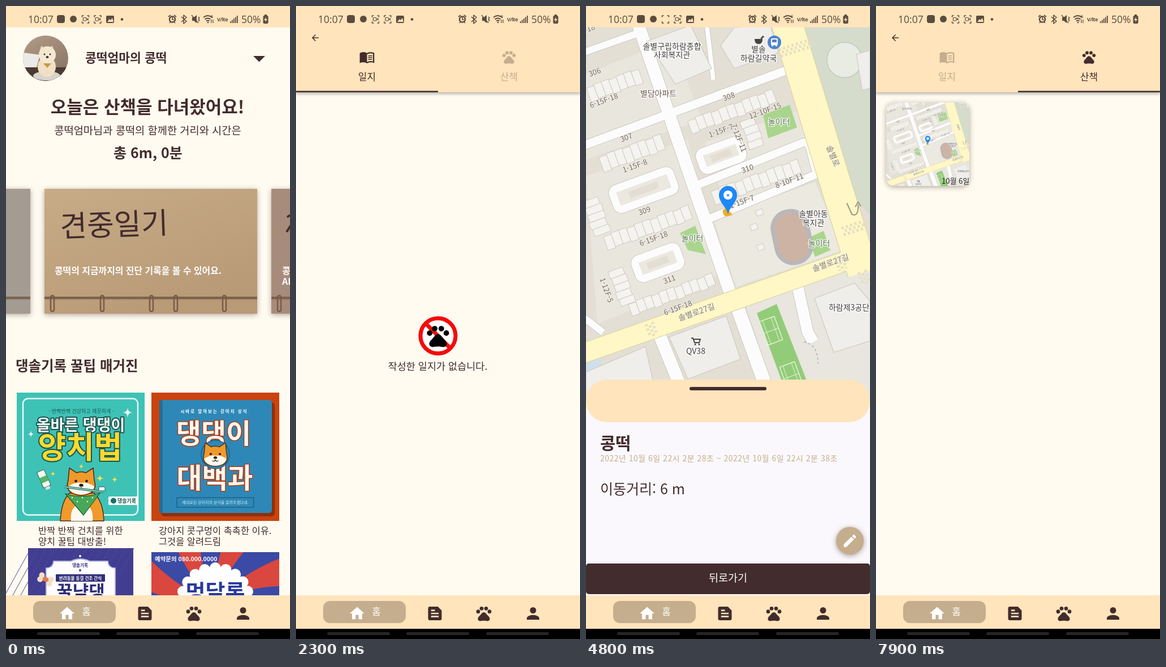
Animation, 502 px wide and 1115 px high, one loop 8000 ms. Source, as an HTML page:

```html
<!DOCTYPE html>
<html lang="ko">
<head>
<meta charset="utf-8">
<style>
html, body { margin: 0; width: 100%; height: 100%; overflow: hidden; background: #fffbf0; }
svg { display: block; width: 502px; height: 1115px; }
text { font-family: "Noto Sans CJK KR", "Noto Sans CJK", "Noto Sans", sans-serif; white-space: pre; }
.num { font-family: "Open Sans", sans-serif; }
.soft { filter: drop-shadow(0 2px 5px rgba(60, 40, 30, .4)); }
.bar { filter: drop-shadow(0 2px 3px rgba(0, 0, 0, .35)); }
</style>
</head>
<body>
<svg id="stage" viewBox="0 0 502 1115"></svg>
<script>
const DARK = '#432c2d', TAN = '#c5ae8d', CREAM = '#ffe4bc', PAPER = '#fffbf0';
const times = (n, fn) => Array.from({ length: n }, (_, i) => fn(i)).join('');
const rect = (x, y, w, h, fill, r = 0, more = '') =>
  `<rect x="${x}" y="${y}" width="${w}" height="${h}" rx="${r}" fill="${fill}" ${more}/>`;
const dot = (x, y, r, fill, more = '') => `<circle cx="${x}" cy="${y}" r="${r}" fill="${fill}" ${more}/>`;
const oval = (x, y, rx, ry, fill, more = '') =>
  `<ellipse cx="${x}" cy="${y}" rx="${rx}" ry="${ry}" fill="${fill}" ${more}/>`;
const path = (d, fill, more = '') => `<path d="${d}" fill="${fill}" ${more}/>`;
const line = (d, color, w, more = '') =>
  `<path d="${d}" fill="none" stroke="${color}" stroke-width="${w}" stroke-linejoin="round" ${more}/>`;
const ink = (color, w) => `stroke="${color}" stroke-width="${w}" stroke-linejoin="round"`;
const halo = (color, w) => ink(color, w) + ' paint-order="stroke"';
const text = (x, y, size, str, fill = DARK, weight = 400, more = '') =>
  `<text x="${x}" y="${y}" font-size="${size}" font-weight="${weight}" fill="${fill}" ${more}>${str}</text>`;
const mid = (x, y, size, str, fill, weight, more = '') =>
  text(x, y, size, str, fill, weight, 'text-anchor="middle" ' + more);
const at = (x, y, body, more = '') => `<g transform="translate(${x} ${y}) ${more}">${body}</g>`;

const ICONS = {
  home: path('M10 20v-6h4v6h5v-8h3L12 3 2 12h3v8z'),
  feed: path('M16 3H5c-1.1 0-2 .9-2 2v14c0 1.1.9 2 2 2h14c1.1 0 2-.9 2-2V8l-5-5zM7 7h5v2H7V7zm10 10H7v-2h10v2zm0-4H7v-2h10v2z'),
  paw: path('M17.3 14.9c-.9-1-1.6-1.9-2.4-2.9-.8-.9-1.6-1.5-2.9-1.5s-2.1.6-2.9 1.5c-.8 1-1.6 1.9-2.4 2.9-1.3 1.3-2.9 2.8-2.6 4.8.3 1 1 2 2.3 2.3.7.2 3.1-.4 5.6-.4s4.9.6 5.6.4c1.3-.3 2-1.3 2.3-2.3.3-2-1.3-3.5-2.6-4.8z') +
    times(4, i => dot([4.5, 9, 15, 19.5][i], i % 3 ? 5.5 : 9.5, 2.5)),
  person: path('M12 12a4 4 0 1 0 0-8 4 4 0 0 0 0 8zm0 2c-2.7 0-8 1.3-8 4v2h16v-2c0-2.7-5.3-4-8-4z'),
  back: path('M20 11H7.8l5.6-5.6L12 4l-8 8 8 8 1.4-1.4L7.8 13H20z'),
  book: path('M21 5c-3-.9-6.800-.7-9 1-2.600-1.900-7.900-2-11 0v15c3-1.500 8.200-1.600 11 .5 2.800-1.700 7.500-2.200 11-.5V6c-.6-.5-1.300-.8-2-1zm0 13.500c-3-.9-6.500-.5-9 1V8c2.600-1.600 6-1.900 9-1z') +
    times(3, i => line(`M13.800 ${10.600 + i * 2.700}q3-1.200 6-.6`, 'currentColor', 1.300)),
  edit: path('M3 17.250V21h3.750L17.810 9.940l-3.750-3.750zM20.700 7a1 1 0 0 0 0-1.400l-2.300-2.300a1 1 0 0 0-1.400 0l-1.900 1.800 3.800 3.800z')
};
for (const k in ICONS) ICONS[k] = ICONS[k].replaceAll('"undefined"', '"currentColor"');
const icon = (name, x, y, size, color) =>
  `<g style="color:${color}">${at(x - size / 2, y - size / 2, ICONS[name], `scale(${size / 24})`)}</g>`;

function mapArt() {
  const EDGE = '#cdc9be', LABEL = '#6e645a';
  const row = (x, y, n, w, h, turn = -20) => at(x, y,
    times(n, i => rect(i * w, i % 3 ? 0 : 2, w, h, '#f5f3ef', 0, ink('#cfcac2', 1))), `rotate(${turn})`);
  const ring = (x, y, w, h) => at(x, y,
    rect(-w / 2, -h / 2, w, h, '#ebe8df', 8, ink(EDGE, 15)) +
    rect(-w / 2, -h / 2, w, h, '#ebe8df', 8, ink('#fdfcfd', 13)) +
    rect(-w / 4, -6, w / 2, 12, '#e2ded3'), 'rotate(-20)');
  const tag = (x, y, s, turn = -20, size = 13, color = LABEL) =>
    at(x, y + 4, mid(0, 0, size, s, color, 500, halo('#f4f2ec', 2)), `rotate(${turn})`);
  const place = (x, y, s, color = '#3d3a38') => mid(x, y + 5, 14, s, color, 500, halo('#fff', 2.500));
  const stripes = (x, y, w, turn) => at(x, y,
    times(3, i => line(`M${-w / 2 + i % 2 * 4} ${i * 6 - 6}h${w}`, '#e6dfc2', 5, 'stroke-dasharray="4 4"')), `rotate(${turn})`);
  const block = d => path(d, '#f0eeea', ink('#cfcac2', 1.200));
  const lanes = [
    ['M88 20L258 515', 22], ['M-5 246L355 113', 15], ['M190 318L385 240Q392 240 395 247L408 296L215 376', 14],
    ['M-5 82L100 45', 12], ['M225 130L212 20', 8], ['M122 560L175 690', 22], ['M262 515L325 690', 24],
    ['M372 485L392 575L402 592', 20], ['M-5 548L30 575', 12]
  ];
  const yellow = [['M-20 617L460 449L520 432', 34], ['M352 20L436 296L490 470', 54]];
  const paint = (list, color, extra) => list.map(([d, w]) => line(d, color, w + extra)).join('');
  const court = y => at(327, y, rect(-14, -22, 28, 44, 'none', 0, ink('#e4f3dc', 1.500)) +
    line('M-14 0H14M-8 -22V22M8 -22V22', '#e4f3dc', 1), 'rotate(-20)');
  return rect(0, 30, 502, 670, '#e3dfd5') +
    path('M0 120L150 60 205 200 0 270zM210 240L390 180 410 300 250 360zM0 300L180 235 240 470 20 560z', '#e9e6dd') +
    path('M225 375L405 310 455 430 265 495z', '#ece9e1') +
    path('M370 20H502V370L470 330z', '#d5dccb') +
    path('M280 520L502 440V700H340z', '#e8e6df') +
    path('M0 628L25 620 40 690H0z', '#cfe0ea') +
    paint(lanes, EDGE, 2) + paint(lanes, '#fdfcfd', 0) +
    ring(102, 324, 108, 38) + ring(239, 263, 74, 34) + ring(127, 452, 78, 36) +
    paint(yellow, '#d8cf9f', 2) + paint(yellow, '#fff7c5', 0) +
    row(0, 143, 7, 14, 26) + row(22, 265, 8, 14.500, 28) + row(179, 201, 11, 14.500, 24) +
    row(220, 325, 11, 14.800, 25) + row(30, 405, 11, 14.500, 25) + row(74, 524, 11, 14.300, 22) +
    row(298, 195, 4, 13, 26, 70) + row(22, 335, 5, 13, 30, 70) + row(66, 459, 5, 13, 27, 70) +
    block('M108 62L185 34 222 110 158 138z') + block('M238 70L262 38 325 30 340 82 262 110z') +
    block('M147 583L248 546 273 622 180 657z') + block('M404 515L475 488 502 520V590L438 610z') +
    block('M0 645L105 600 125 690H0z') +
    dot(457, 95, 31, '#e9ece3', ink('#c4cabb', 1.500)) + block('M478 85L502 78V145L488 148z') +
    times(8, i => rect([20, 50, 258, 277, 257, 296, 5, 340][i], [208, 195, 392, 365, 430, 528, 445, 500][i], 12, 10, '#f5f3ef', 0,
      ink('#cfcac2', 1) + ` transform="rotate(-20 ${[20, 50, 258, 277, 257, 296, 5, 340][i]} 300)" visibility="${i > 1 && i < 5 ? 'visible' : 'hidden'}"`)) +
    path('M313 192L360 174 373 214 322 233zM166 400L193 387 212 437 180 430zM392 409L420 396 432 430 405 442z', '#a9d58c') +
    path('M302 541L337 525 402 690H357z', '#93cc78') + court(572) + at(36, 0, court(652)) +
    rect(333, 361, 62, 92, '#cdb3a3', 30, ink('#b9b7bb', 7) + ' transform="rotate(-12 364 407)"') +
    line('M385 592Q410 595 410 630', '#bbb', 2, 'stroke-dasharray="4 4"') +
    stripes(370, 74, 58, -18) + stripes(482, 388, 60, -18) + stripes(115, 568, 20, 70) + stripes(450, 452, 26, 70) + stripes(492, 478, 24, 70) +
    line('M461 347L470 367Q482 372 481 350M476 354l5 -9 5 8', '#9c9682', 2) +
    tag(17, 117, '306') + tag(33, 167, '6-15F-18') + tag(73, 232, '307') + tag(88, 282, '1-15F-8') +
    tag(254, 160, '308') + tag(318, 185, '12-10F-15') + tag(240, 220, '1-15F-7') + tag(266, 230, '7-12F-11', 68) +
    tag(287, 287, '310') + tag(361, 308, '8-10F-11') + tag(277, 345, '1-15F-7') + tag(105, 361, '309') +
    tag(121, 410, '6-15F-18') + tag(32, 498, '1-12F-5', 70) + tag(149, 482, '311') + tag(164, 532, '6-15F-18') + tag(8, 40, '-18') +
    tag(432, 262, '솔별로', 68, 14, '#8f8358') + tag(197, 540, '솔별로27길', -19, 14, '#8f8358') + tag(434, 453, '솔별로27길', -19, 14, '#8f8358') +
    place(152, 71, '솔별구립하람종합') + place(152, 86, '사회복지관') + place(128, 154, '별담아파트', '#6a5548') +
    place(305, 76, '별솔') + place(305, 92, '하람길약국') + place(402, 366, '솔별아동') + place(402, 382, '복지관') +
    place(341, 204, '놀이터', '#4d6b3c') + place(188, 409, '놀이터', '#4d6b3c') + place(412, 418, '놀이터', '#4d6b3c') +
    place(465, 531, '하람제3공단') + place(194, 608, 'QV38') +
    path('M298 58h14q0 9-7 9t-7-9zM308 57l5-5 2 2-4 4z', '#444') +
    dot(333, 64, 12, '#4d84d2') + rect(327, 57, 12, 12, '#fff', 2) + rect(329, 59, 8, 5, '#4d84d2') + rect(328, 69, 3, 2, '#fff') + rect(335, 69, 3, 2, '#fff') +
    line('M186 585h3l3 8h8l2-6h-12', '#444', 2) + dot(193, 596, 1.500, '#444') + dot(200, 596, 1.500, '#444') +
    path('M242 360l6-6 11 14-11 3q-7-3-6-11z', '#f0ad25') +
    path('M251 367C248 353 235 346 235 333a16 16 0 0 1 32 0C267 346 254 353 251 367z', '#1e88f5') +
    dot(251, 333, 8, '#fff') + path('M248 332h6l-3 4z', '#1e88f5');
}

const star = (x, y, r, fill) => path(`M${x} ${y - r}Q${x} ${y} ${x + r} ${y}Q${x} ${y} ${x} ${y + r}Q${x} ${y} ${x - r} ${y}Q${x} ${y} ${x} ${y - r}z`, fill);

function shibaHead(x, y, k) {
  const o = ink('#4a2a17', 1.500);
  return at(x, y, path('M-22 -4L-20 -25 -8 -17Q0 -20 8 -17L20 -25 22 -4Q27 12 14 18Q0 24 -14 18Q-27 12 -22 -4z', '#f09a2c', o) +
    path('M0 0Q-10 -2 -22 6Q-20 18 0 20Q20 18 22 6Q10 -2 0 0z', '#fffaf0') +
    dot(-9, -3, 2.300, '#2c1a12') + dot(9, -3, 2.300, '#2c1a12') + oval(0, 4, 3.500, 2.500, '#2c1a12') +
    line('M-6 10Q-2 13 0 8Q2 13 6 10', '#2c1a12', 1.300), `scale(${k})`);
}

function toothCard() {
  const o = halo('#17574f', 4);
  return rect(19, 681, 226, 226, '#3fc2b6') + rect(30, 691.500, 203, 205, 'none', 9, ink('#e9fbf8', 2.500)) +
    mid(133, 717, 9, '- 반짝반짝 건강하고 깨끗하게 -', '#17574f', 500) +
    mid(132, 748, 27, '올바른 댕댕이', '#fff', 900, o) + mid(131, 797, 54, '양치법', '#ffd92e', 900, o) +
    star(215, 716, 9, '#fff') + star(44, 754, 6, '#fff') + star(166, 832, 7, '#ffe04a') + star(192, 834, 6, '#ffe04a') + star(83, 824, 5, '#ffe04a') + star(133, 811, 5, '#ffe04a') +
    at(66, 831, rect(-7, -13, 14, 30, '#f2f8ee', 2, ink('#17574f', 1)) + rect(-7, -2, 14, 10, '#58b36b') + rect(-4, 17, 8, 5, '#d9e3dd', 1), 'rotate(-24)') +
    path('M96 907Q98 872 112 858H156Q172 874 173 907z', '#f09a2c', ink('#4a2a17', 1.500)) + path('M115 907Q112 880 134 876Q156 880 153 907z', '#fffaf0') +
    shibaHead(133, 840, 1.050) + path('M105 859Q135 869 166 858L137 897z', '#47a85a', ink('#1d5a33', 1.200)) +
    times(5, i => dot(117 + i * 9, 866 + i % 2 * 7, 1.200, '#fff')) +
    line('M104 847L172 856', '#17574f', 4) + line('M104 847L172 856', '#8fd8c2', 2) + rect(164, 847, 11, 7, '#fff', 1, ink('#17574f', 1)) +
    rect(181, 864, 53, 15, '#fff', 2) + dot(190, 871.500, 5, '#17706a') + text(197, 875, 9, '댕솔기록', '#17574f', 700);
}

function bookCard() {
  const o = halo('#b23a12', 3);
  return rect(257, 681, 226, 226, '#c9430f') + rect(274, 698, 201, 201, '#8f300f', 6) + rect(271, 694, 199, 199, '#2e88b7', 5) +
    rect(271, 694, 6, 199, '#226f99', 3) +
    mid(368, 717, 7.500, '시바로 알아보는 강아지 상식', '#fff', 700, 'letter-spacing="2"') +
    mid(367, 770, 48, '댕댕이', '#fff8ee', 900, o) + mid(369, 849, 49, '대백과', '#fff8ee', 900, o) +
    dot(370, 790, 25, '#2e88b7', ink('#1d5f86', 1.500)) + shibaHead(370, 792, .9) +
    rect(302, 866, 136, 17, 'none', 0, ink('#174e70', 1)) + mid(370, 877, 7, '제대로된 강아지의 상식을 알려주겠다네.', '#d8edf7');
}

function snackCard() {
  return rect(39, 955, 186, 90, '#413e92') + times(14, i => line(`M${44 + i * 14} 955l-50 90`, '#4b489e', 1)) +
    path('M71 1045V990Q83 990 84 978H115Q131 970 148 978H180Q181 990 193 990V1045z', '#fdfdff', ink('#b9b7e2', 2)) +
    dot(131, 969, 2, '#fff') + mid(131, 988, 7.500, '댕솔기록', '#2f2d78', 700) + dot(131, 994, 2, '#413e92') +
    rect(88, 1001, 87, 13, '#2f2d78', 1) + mid(131.500, 1010.500, 7.500, '반려동물 동결 건조 간식', '#fff', 700) +
    mid(132, 1043, 31, '꿀냠댕', '#2f2d78', 900) +
    at(70, 1010, rect(-8, -4, 16, 8, '#dd7a4f') + times(4, i => dot(i % 2 ? 9 : -9, i < 2 ? -4 : 4, 5, '#f6dcc5')), 'rotate(25)');
}

function bathCard() {
  const ray = i => { const p = (a, r) => `${370 + r * Math.cos(a)} ${1050 + r * Math.sin(a)}`, a = i * .785 + .3;
    return path(`M370 1050Q${p(a, 80)} ${p(a + .35, 190)}L${p(a + .75, 190)}Q${p(a + .4, 80)} 370 1050z`, '#3b4aa5'); };
  return `<g clip-path="url(#bath)">${rect(257, 962, 226, 90, '#d9473f')}${times(8, ray)}` +
    times(20, i => dot(370 + 60 * Math.cos(i * .314), 1050 + 60 * Math.sin(i * .314), 10, '#fff')) + dot(370, 1050, 62, '#fff') +
    mid(370, 1046, 38, '멍달록', '#2a3b9c', 900) + '</g>' + text(263, 978, 10.500, '예약문의 080.000.0000', '#fff', 700);
}

function homeArt() {
  const binding = (x, w) => rect(x, 512, w, 4, '#7d614d') + rect(x, 516, w, 1.500, '#00000022');
  const loops = [82, 170, 257, 300, 386].map(x => rect(x - 3, 510, 6, 28, 'none', 3, ink('#7a5a45', 2.500))).join('');
  const slide = (x, w, fill) => rect(x, 322, w, 220, fill, 0, 'class="soft"') + binding(x, w);
  return rect(0, 0, 502, 1038, PAPER) +
    `<g clip-path="url(#face)">${rect(30, 52, 80, 80, 'url(#wall)')}${path('M30 82L60 86 54 108H30z', '#eceae6')}${rect(30, 108, 80, 30, '#4a3a33')}` +
    oval(72, 123, 24, 8, '#d8d4cd') + oval(72, 107, 16, 18, '#efe0c6') + path('M58 84L62 70 72 76 82 70 87 84z', '#e6d2b2') + dot(73, 86, 15, '#f4e8d2') +
    dot(68, 85, 1.500, '#332') + dot(78, 85, 1.500, '#332') + oval(73, 90, 2.500, 2, '#332') + path('M66 101h14l-7 8z', '#c99a3e') + '</g>' +
    text(140, 99, 21.500, '콩떡엄마의 콩떡', DARK, 700) + path('M437 88H458L447.500 98.500z', DARK) +
    mid(250, 189, 31, '오늘은 산책을 다녀왔어요!', DARK, 700) +
    mid(250.500, 226, 18.700, '콩떡엄마님과 콩떡의 함께한 거리와 시간은', DARK, 500) +
    mid(251, 268, 25, '총 6m, 0분', DARK, 700) +
    slide(-20, 63, '#a49b93') + slide(68, 376, 'url(#kraft)') + slide(469, 60, '#a88c7b') + loops +
    rect(480, 510, 6, 28, 'none', 3, ink('#7a5a45', 2.500)) +
    at(96, 407, text(0, 0, 52, '견중일기', DARK, 500), 'rotate(-2)') + line('M497 372q4-4 8-3M496 398l9-14', DARK, 4) +
    text(86, 472, 15.900, '콩떡의 지금까지의 진단 기록을 볼 수 있어요.', '#fff', 700) +
    text(488, 472, 15.900, '콩', '#fff', 700) + text(488, 491, 15.900, 'AI', '#fff', 700) +
    text(17, 643, 24.500, '댕솔기록 꿀팁 매거진', DARK, 700) + toothCard() + bookCard() +
    text(57, 930, 16.400, '반짝 반짝 건치를 위한', DARK, 500) + text(57, 949, 16.400, '양치 꿀팁 대방출!', DARK, 500) +
    text(270, 930, 16.400, '강아지 콧구멍이 촉촉한 이유.', DARK, 500) + text(270, 949, 16.400, '그것을 알려드림', DARK, 500) +
    snackCard() + bathCard();
}

function loaderArt() {
  const o = ink('#4b2d18', 4), fur = '#efa24e', steel = '#35353a';
  const rod = d => line(d, steel, 13) + line(d, '#c9c9cc', 6);
  const knobs = [[448, 668], [446, 687], [472, 668], [474, 688]].map(([x, y]) => dot(x, y, 11, '#fff', ink(steel, 3))).join('');
  const fill = [[448, 668], [446, 687], [472, 668], [474, 688]].map(([x, y]) => dot(x, y, 9.500, '#fff')).join('');
  return `<g id="dust">${line('M62 685h10l8-2 8 2h12M140 740h6l6 1', steel, 4, 'stroke-linecap="round"')}</g>` +
    `<g id="farLegs">${rect(190, 752, 26, 35, '#fffaf0', 13, o)}${rect(322, 740, 26, 36, fur, 12, o)}</g><g id="dog">` +
    path('M182 718C160 722 158 702 165 697C166 686 182 682 190 690z', '#fffaf0', o) +
    path('M169 722C170 692 203 682 240 683L354 690C354 724 350 764 326 774L208 774C182 768 168 748 169 722z', fur, o) +
    path('M202 766Q270 754 345 764L326 774H208z', '#fffaf0', o) +
    path('M235 686Q228 735 235 775H255Q249 735 254 686z', '#f0c43c', o) + line('M243 752Q242 765 245 775', '#4b2d18', 3) +
    rod('M252 497L249 662') + rod('M252 497L462 570') + dot(252, 497, 10, '#d2d2d4', ink(steel, 4)) +
    path('M256 662C254 618 284 598 308 598C338 601 357 628 355 668C369 665 383 673 381 687C379 700 364 700 345 698C354 720 330 730 300 722L256 700z', fur) +
    line('M257 655C258 618 284 598 308 598C338 601 357 628 355 668C369 665 383 673 381 687C379 700 364 700 345 698M353 699Q353 730 349 752', '#4b2d18', 4) +
    path('M289 603Q300 606 303 601Q297 595 298 587Q306 597 321 600', fur, o) +
    path('M297 656C280 666 264 684 246 688C230 688 224 671 234 662C243 654 257 660 264 651', fur, o) +
    oval(327, 660, 7.500, 8.500, '#2b211d') + oval(353, 660, 3.500, 7, '#2b211d') + oval(374, 681, 7, 5, '#2b211d') + line('M345 698Q362 700 372 690', '#4b2d18', 3) + '</g>' +
    `<g id="nearBack">${line('M209 738Q218 755 210 765', '#4b2d18', 4)}${path('M182 762Q180 782 196 784Q214 784 215 764Q206 752 198 758Q188 752 182 762z', '#fffaf0', o)}</g>` +
    `<g id="nearFront">${path('M302 742V782A13 13 0 0 0 328 782V742', fur, o)}${path('M302 766Q308 772 314 767Q321 772 328 766V782A13 13 0 0 1 302 782z', '#fffaf0', o)}</g>` +
    `<g id="bone">${line('M462 572V664', steel, 4)}${knobs}${rect(450, 669, 22, 17, '#fff')}${fill}${line('M462 662v10l-6 8 7 9', steel, 3)}</g>` +
    dot(462, 570, 10, '#d2d2d4', ink(steel, 4));
}

function tabsArt() {
  const tab = (id, name, x, label) => `<g id="${id}" style="color:${DARK}">${icon(name, x, 90, 28, 'inherit')}${mid(x, 131, 17, label, 'currentColor', 500)}</g>`;
  return rect(0, 0, 502, 1038, PAPER) +
    `<g id="diary"><g id="loader" transform="translate(251 519) scale(1.0204) translate(-251 -519)">${loaderArt()}</g><g id="empty">` +
    dot(251, 581, 31, '#fff', ink('#f50a0a', 7)) + line('M229 559L273 603', '#f50a0a', 7) + icon('paw', 251, 581, 47, '#000') +
    mid(250.500, 641, 17.500, '작성한 일지가 없습니다.', DARK, 500) + '</g></g>' +
    `<g id="walk">${rect(18, 170, 147, 147, '#e3dfd5', 14, 'class="soft"')}<g clip-path="url(#thumb)"><use href="#map" transform="translate(18 136) scale(.2928)"/></g>` +
    text(116, 313, 13, '10월 6일', '#222', 500) + '</g>' +
    rect(-1, 0, 504, 152, CREAM, 0, 'class="bar"') + icon('back', 34, 56, 18, DARK) +
    tab('tabA', 'book', 125.500, '일지') + tab('tabB', 'paw', 376.500, '산책') + `<g id="mark">${rect(0, 149.500, 251, 2.500, DARK)}</g>`;
}

function detailArt() {
  return rect(0, 0, 502, 1038, '#faf8fc') + `<g clip-path="url(#view)"><use href="#map"/></g>` +
    rect(0, 658, 502, 75, CREAM, 37) + rect(183, 671, 136, 6, DARK, 3) +
    text(25, 781, 29.500, '콩떡', DARK, 700) +
    text(25, 802, 13.900, '2022년 10월 6일 22시 2분 28초 ~ 2022년 10월 6일 22시 2분 38초', TAN, 400, 'letter-spacing=".55"') +
    text(25, 860, 25, '이동거리: 6 m', DARK, 500) +
    dot(466.500, 942, 24.500, TAN, 'class="soft"') + icon('edit', 466.500, 942, 29, '#fff') +
    rect(0, 1036, 502, 2, '#fff') + rect(0, 982, 502, 54, DARK, 5) + mid(251, 1014, 18.500, '뒤로가기', '#fff', 500);
}

function chromeArt() {
  const G = '#5a4c3e';
  const corners = x => line(`M${x - 6} 20v-3h3M${x + 3} 17h3v3M${x + 6} 27v3h-3M${x - 3} 30h-3v-3`, G, 1.300);
  const cam = x => rect(x - 4, 20.500, 5.500, 5.500, 'none', 1, ink(G, 1.200)) + path(`M${x + 2} 23l3-2v5z`, G);
  return rect(0, 0, 502, 37.500, CREAM) + text(39, 29.500, 17.500, '10:07', G, 400, 'class="num"') +
    rect(90, 16, 14, 14, G, 4) + dot(119, 23, 6, G) + corners(140.500) + `<g id="rec">${cam(140.500)}</g>` + corners(162) + cam(162) +
    rect(177, 17, 14, 13, G, 2) + path('M179 28l4-5 2 2 3-4 2 7z', CREAM) + dot(205, 23.500, 2.300, G) +
    dot(294, 23.500, 5, 'none', ink(G, 2.500)) + line('M294 20v4h3M287 19l4-3M301 19l-4-3M289 30l2-2M299 30l-2-2', G, 1.600) +
    line('M310 19l9 8-5 4V16l5 4-9 8', G, 1.600) +
    path('M329 20h3l5-4v14l-5-4h-3z', G) + line('M328 16l12 14M340 19l2 2-2 2 2 2-2 2', G, 1.400) +
    line('M349 20q8-6 15 0M351.500 23.500q5.500-4 10 0M354 26.500q3-2 5.500 0', G, 1.800) + dot(357, 29, 1.300, G) +
    text(362, 21, 7, '6', G, 700, 'class="num"') + line('M363 30v-6M366 24v6', G, 1.200) +
    text(373, 27, 9, 'V/lte', G, 700, 'class="num" letter-spacing="-.5"') +
    times(5, i => rect(396 + i * 3, 27 - i * 2.500, 1.800, 3 + i * 2.500, G)) +
    text(416, 29.500, 17.500, '50%', G, 400, 'class="num"') +
    rect(454.500, 17, 9, 14, G, 2) + rect(457, 15, 4, 2, G) + path('M460 19l-4 6h3l-1 4 4-6h-3z', CREAM) +
    rect(0, 1038, 502, 59, CREAM) + rect(48, 1048, 146, 39, TAN, 12) + icon('home', 108, 1070, 31, '#fff') +
    mid(142, 1073, 17, '홈', '#fff', 500) + icon('feed', 245.500, 1070, 32, DARK) + icon('paw', 332, 1070, 32, DARK) + icon('person', 419, 1070, 33, DARK) +
    rect(0, 1097, 502, 18, '#000') + [55, 195, 336].map(x => rect(x, 1103, 111, 5, '#262626', 2.500)).join('');
}

const clip = (id, body) => `<clipPath id="${id}">${body}</clipPath>`;
const fade = (id, a, b) => `<linearGradient id="${id}" x2=".6" y2="1"><stop stop-color="${a}"/><stop offset="1" stop-color="${b}"/></linearGradient>`;
const $ = id => document.getElementById(id);
$('stage').innerHTML = `<defs><g id="map">${mapArt()}</g>` +
  clip('face', dot(70, 92, 40)) + clip('bath', rect(257, 962, 226, 90)) + clip('thumb', rect(18, 170, 147, 147, '', 14)) + clip('view', rect(0, 30, 502, 666)) +
  fade('wall', '#b39d88', '#8a7464') + fade('kraft', '#c7ab87', '#b89a76') + '</defs>' +
  `<g>${homeArt()}</g>${rect(0, 0, 502, 1038, '#000', 0, 'id="shadeA"')}<g id="tabs">${tabsArt()}</g>` +
  `${rect(0, 0, 502, 1038, '#000', 0, 'id="shadeB"')}<g id="detail">${detailArt()}</g>${chromeArt()}`;

// ms: page opens, list loaded, tab swiped, map opens, map closes
const OPEN = 755, LOADED = 1750, SWIPE = 2600, MAP = 4350, CLOSE = 6950, SPAN = 300;
const unit = v => Math.max(0, Math.min(1, v));
const out = u => 1 - (1 - u) ** 3;
const show = (id, on) => $(id).setAttribute('visibility', on ? 'visible' : 'hidden');
const move = (id, value) => $(id).setAttribute('transform', value);
const zoom = (id, s, alpha) => {
  move(id, `translate(251 519) scale(${s}) translate(-251 -519)`);
  $(id).style.opacity = alpha;
  $(id).style.display = alpha > 0 ? '' : 'none';
};
const mix = e => {
  const a = [67, 44, 45], b = [197, 174, 141];
  return `rgb(${a.map((v, i) => Math.round(v + (b[i] - v) * e))})`;
};
const shade = (id, u) => $(id).setAttribute('opacity', u < 1 ? .53 * unit(u * 2.100) : 0);

function draw(t) {
  const a = unit((t - OPEN) / SPAN), b = unit((t - MAP) / SPAN), c = unit((t - CLOSE) / SPAN);
  zoom('tabs', .85 + .15 * out(a), unit(a * 4));
  shade('shadeA', a);
  zoom('detail', c ? 1 - .1 * out(c) : .85 + .15 * out(b), c ? 1 - unit(c * 1.600) : unit(b * 4));
  shade('shadeB', b);

  const s = out(unit((t - SWIPE) / SPAN));
  move('diary', `translate(${-502 * s} 0)`);
  move('walk', `translate(${502 * (1 - s)} 0)`);
  move('mark', `translate(${251 * s} 0)`);
  $('tabA').style.color = mix(s);
  $('tabB').style.color = mix(1 - s);

  $('loader').style.display = t < LOADED ? '' : 'none';
  $('empty').style.display = t < LOADED ? 'none' : '';
  const w = Math.sin((t - 900) / 400 * Math.PI * 2), d = (((t - 900) % 400) + 400) % 400 / 400;
  move('dog', `translate(0 ${-2 * Math.abs(w)})`);
  move('nearBack', `rotate(${16 * w} 200 735)`);
  move('nearFront', `rotate(${-18 * w} 315 735)`);
  move('farLegs', `translate(${-9 * w} 0)`);
  move('bone', `rotate(${5 * w} 462 570)`);
  move('dust', `translate(${-45 * d} 0)`);
  $('dust').style.opacity = 1 - d;

  show('rec', Math.floor(t / 950) % 2 === 0);
}
const t0 = performance.now();
const tick = () => { draw((performance.now() - t0) % 8000); requestAnimationFrame(tick); };
draw(0);
requestAnimationFrame(tick);
</script>
</body>
</html>
```
